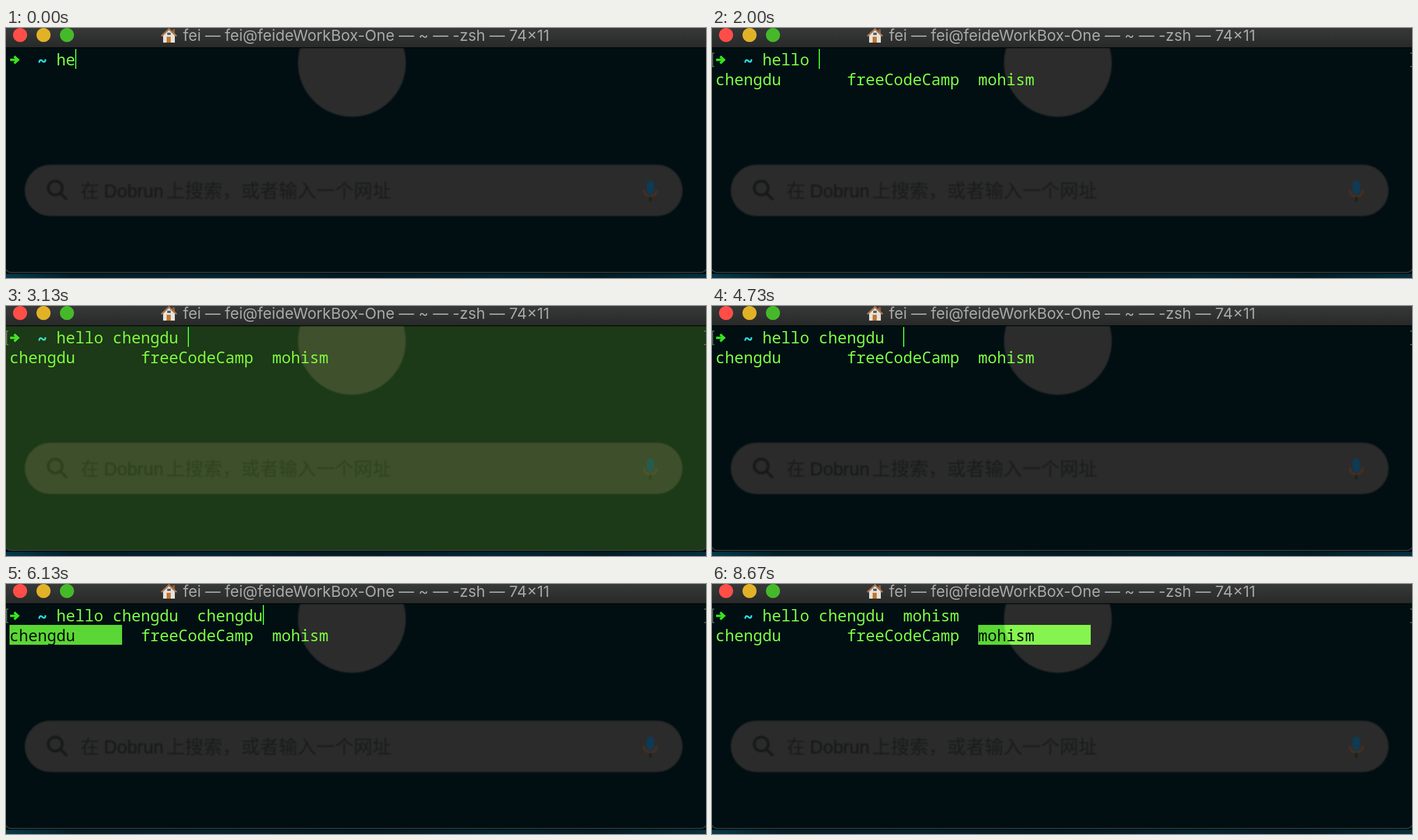
Animation, 1194 px wide and 428 px high, one loop 8.74 s. Source, as an HTML page:

```html
<!DOCTYPE html>
<html lang="zh-CN">
<head>
<meta charset="utf-8">
<title>Terminal completion</title>
<style>
  html, body { margin: 0; width: 100%; height: 100%; overflow: hidden; background: #010f13; }
  svg { display: block; width: 100vw; height: 100vh; }
  text { white-space: pre; }
  .mono { font: 26.667px "Noto Sans Mono", "DejaVu Sans Mono", monospace; fill: #7dff42; }
  .tilde { fill: #2be0ea; stroke: #2be0ea; stroke-width: 0.8; font-weight: 700; }
  .title { font: 26.15px Inter, "Open Sans", sans-serif; fill: #a8a8a8; }
  .hint { font: 500 32px "Noto Sans CJK SC", "Noto Sans CJK", sans-serif; fill: #191b1b; }
  .latin { font: 31px "Liberation Sans", Arial, sans-serif; stroke: #191b1b; stroke-width: 0.6; }
  .soft { filter: blur(0.8px); }
  #pick { fill: #5ac822; mix-blend-mode: plus-lighter; }
  .mark { fill: none; stroke: #46644c; stroke-width: 2; }
</style>
</head>
<body>
<svg viewBox="0 0 1194 428" preserveAspectRatio="none">
  <defs>
    <linearGradient id="bar" x2="0" y2="1">
      <stop stop-color="#373838"/>
      <stop offset="1" stop-color="#282929"/>
    </linearGradient>
    <linearGradient id="desk">
      <stop stop-color="#05394b"/>
      <stop offset=".1" stop-color="#021e29"/>
      <stop offset=".3" stop-color="#03232f"/>
      <stop offset=".5" stop-color="#021a24"/>
      <stop offset=".7" stop-color="#032632"/>
      <stop offset=".85" stop-color="#021c26"/>
      <stop offset="1" stop-color="#04303f"/>
    </linearGradient>
    <path id="pane" d="M0 34H1194V413Q1192 418.500 1184 418.500H10Q2 418.500 0 413Z"/>
  </defs>

  <rect width="1194" height="428" fill="url(#desk)"/>
  <rect y="400" width="1194" height="21" fill="#010a0d"/>
  <use href="#pane" fill="#010f13"/>

  <!-- page showing through the window -->
  <g class="soft">
    <circle cx="590" cy="60" r="92" fill="#2c2c2c"/>
    <rect x="32" y="234" width="1122" height="88" rx="44" fill="#2b2b2b"/>
    <g fill="none" stroke="#171818" stroke-width="4.500">
      <circle cx="84" cy="274" r="12"/>
      <path d="M92 282L104 294"/>
    </g>
    <text class="hint" y="290"><tspan x="127">在</tspan><tspan class="latin" x="167">Dobrun</tspan><tspan x="273">上搜索，或者输入一个网址</tspan></text>
    <rect x="1092.500" y="261" width="13" height="24" rx="6.500" fill="#0f3a54"/>
    <path d="M1088 277A11 11.500 0 0 0 1110 277" fill="none" stroke="#4c2f20" stroke-width="3.500"/>
    <path d="M1099 289V297" stroke="#16211a" stroke-width="4"/>
  </g>

  <!-- terminal text -->
  <g id="marks" class="mark">
    <path d="M4 43H1V66H4M1191 43H1194M1191 66H1194"/>
  </g>
  <rect id="pick" y="70" width="192" height="34"/>
  <path d="M7 54.500H19M14 48.500L20.500 54.500L14 60.500" fill="none" stroke="#35e51f" stroke-width="4"/>
  <text class="mono tilde" x="54" y="65.500">~</text>
  <text class="mono" id="input" x="86" y="64"></text>
  <g class="mono" id="list">
    <text x="6" y="98">chengdu</text>
    <text x="230" y="98">freeCodeCamp</text>
    <text x="454" y="98">mohism</text>
  </g>
  <rect id="cursor" y="36" width="2" height="34" fill="#3cf52c"/>
  <use id="bell" href="#pane" fill="#88e030"/>
  <path d="M0 413Q2 418.500 10 418.500H1184Q1192 418.500 1194 413" fill="none" stroke="#3b4440" stroke-width="1.500"/>

  <!-- title bar -->
  <rect width="1194" height="33" fill="url(#bar)"/>
  <rect y="33" width="1194" height="1.500" fill="#050606"/>
  <circle cx="24" cy="12" r="12" fill="#fe4e47"/>
  <circle cx="64" cy="12" r="12" fill="#e2b226"/>
  <circle cx="104" cy="12" r="12" fill="#45b92a"/>
  <g>
    <path d="M284 2H288V10H284Z" fill="#8f5a38"/>
    <path d="M268 12L278 3L288 12V25H268Z" fill="#e6e3dc"/>
    <path d="M265 14L278 2L291 14" fill="none" stroke="#a8774e" stroke-width="3"/>
    <rect x="274" y="15" width="7" height="10" fill="#c4762c"/>
    <rect x="275" y="8" width="6" height="4" fill="#54606a"/>
  </g>
  <text class="title" x="302" y="22">fei — fei@feideWorkBox-One — ~ — -zsh — 74×11</text>
</svg>
<script>
  const LOOP = 8740, CELL = 16, LEFT = 6, PROMPT = 5;
  const BLINK_ON = 600, BLINK = 1100;
  const BELL_HALF = 135, BELL_PEAK = 0.2;
  const LIST_AT = 1670;
  const bells = [1805, 3130, 5465];

  // time, command line, index of the highlighted choice
  const steps = [
    [0, "he"],
    [130, "hel"],
    [270, "hell"],
    [470, "hello"],
    [800, "hello "],
    [LIST_AT, "hello "],
    [2300, "hello chengdu", 0],
    [2800, "hello chengdu "],
    [3000, "hello chengdu "],
    [4700, "hello chengdu  "],
    [5330, "hello chengdu  "],
    [6000, "hello chengdu  chengdu", 0],
    [7000, "hello chengdu  freeCodeCamp", 1],
    [8000, "hello chengdu  mohism", 2]
  ];

  const $ = id => document.getElementById(id);
  const [input, list, pick, cursor, bell, marks] =
    ["input", "list", "pick", "cursor", "bell", "marks"].map($);
  const show = (el, on) => { el.style.display = on ? "" : "none"; };
  const column = n => LEFT + n * CELL;

  function draw(t) {
    const [at, line, choice = -1] = steps.findLast(s => s[0] <= t);
    const listed = t >= LIST_AT;

    input.textContent = line;
    cursor.setAttribute("x", column(PROMPT + line.length));
    show(cursor, (t - at) % BLINK < BLINK_ON);

    show(list, listed);
    show(marks, listed);
    show(pick, choice >= 0);
    pick.setAttribute("x", column(Math.max(choice, 0) * 14));
    [...list.children].forEach((item, i) => {
      item.style.fill = i === choice ? "#03100a" : "";
    });

    const glow = Math.max(0, ...bells.map(b => 1 - Math.abs(t - b) / BELL_HALF));
    bell.style.opacity = glow * BELL_PEAK;
  }

  const start = performance.now();
  function tick() {
    draw((performance.now() - start) % LOOP);
    requestAnimationFrame(tick);
  }
  tick();
</script>
</body>
</html>
```
